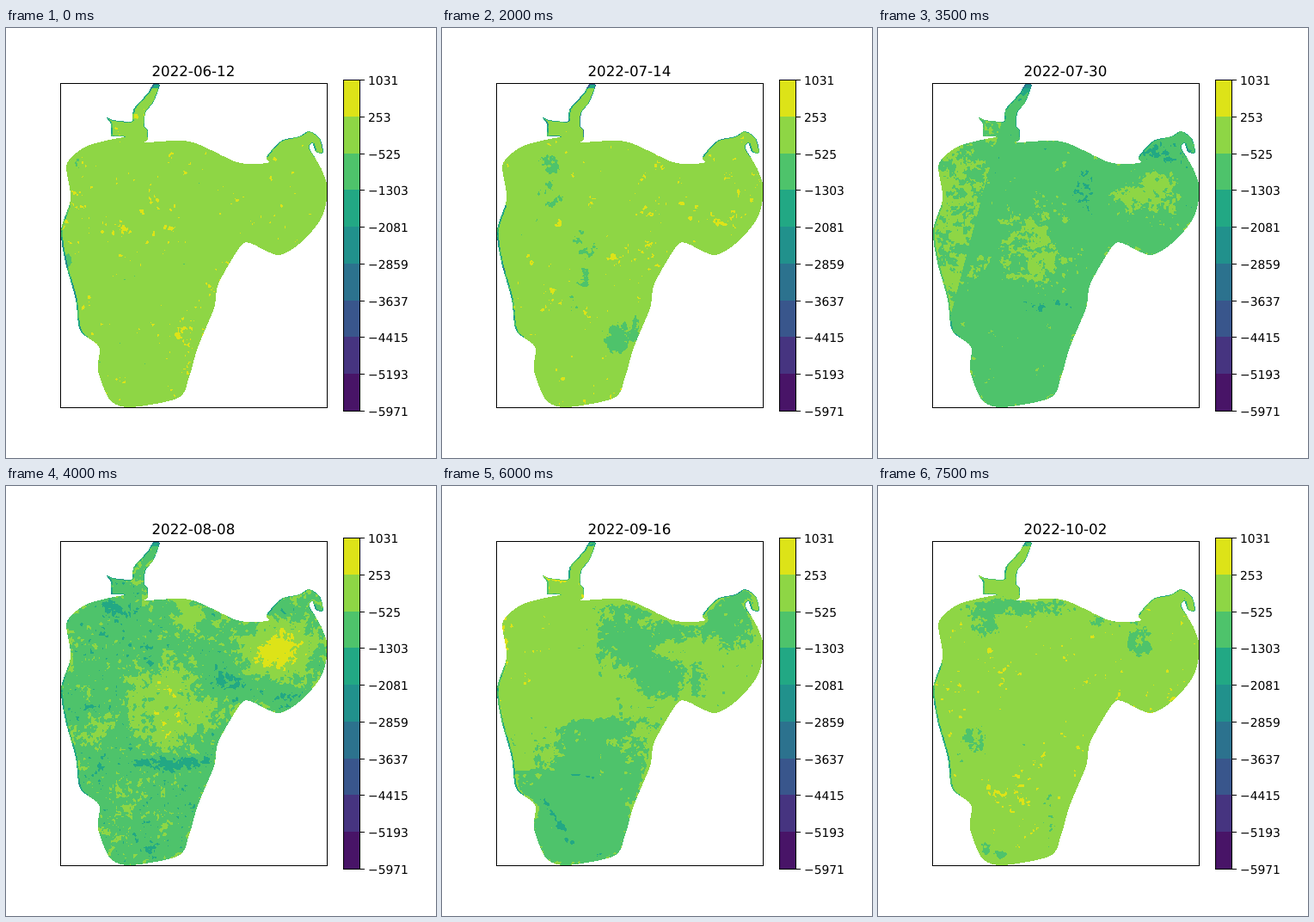
An HTML page with a canvas for the animation above (8000 ms loop, 500 by 500 pixels).

```html
<!DOCTYPE html>
<html lang="en">
<head>
<meta charset="utf-8">
<style>
html, body { margin: 0; width: 100%; height: 100%; overflow: hidden; background: #fff; }
canvas, svg { position: absolute; left: 0; top: 0; width: 500px; height: 500px; }
text { font-family: "DejaVu Sans", sans-serif; font-size: 13.89px; text-rendering: geometricPrecision; }
#date { font-size: 16.67px; text-anchor: middle; }
</style>
</head>
<body>
<canvas id="map" width="500" height="500"></canvas>
<svg id="plot" viewBox="0 0 500 500">
  <text id="date" x="217.9" y="56"></text>
  <rect x="63.5" y="64.5" width="310" height="377" fill="none" stroke="#000"/>
</svg>
<script>
const SIZE = 500, STEP = 500;
const COLORS = ['#dde318', '#8ed645', '#4ec36b', '#22a884', '#21918c', '#2c728e', '#39568c', '#463480', '#481467'];

// Key points of the shoreline and of the inlet above it
const LAKE = '78,148 97,136 138,127 157,133 213,132 265,155 288,158 306,156 303,149 320,131 340,126 352,120 364,128 368,144 360,143 356,133 352,139 366,164 373,188 366,220 343,248 316,263 283,249 271,254 246,297 241,325 222,371 212,405 200,429 145,440 121,432 107,398 108,370 86,351 81,315 69,272 64,235 75,200 73,180 70,160';
const INLET = '171,65 178,66 171,85 161,98 160,114 164,118 164,129 157,133 138,128 136,125 122,125 122,111 117,104 124,107 146,109 148,94 165,75';

const clamp = (v, lo, hi) => Math.max(lo, Math.min(hi, v));

// Closed Catmull-Rom curve; a smaller bend keeps the corners sharper
function curve(text, bend) {
  const pts = text.split(' ').map(p => p.split(',').map(Number));
  const at = i => pts[(i + pts.length) % pts.length];
  const handle = (i, sign) => at(i).map((v, k) => v + sign * bend * (at(i + 1)[k] - at(i - 1)[k]) / 6);
  return new Path2D('M' + at(0) + pts.map((_, i) => `C${handle(i, 1)} ${handle(i + 1, -1)} ${at(i + 1)}`).join('') + 'Z');
}

const canvas = document.getElementById('map');
const ctx = canvas.getContext('2d', { willReadFrequently: true });
ctx.translate(0.5, 0.5);
for (const path of [curve(LAKE, 0.8), curve(INLET, 0.3)]) {
  ctx.fill(path);
  ctx.stroke(path);
}
const alpha = ctx.getImageData(0, 0, SIZE, SIZE).data;
const inside = (x, y) => x > 63 && x < 373 && y > 64 && y < 441 && alpha[(y * SIZE + x) * 4 + 3] > 127;
const cells = [];
for (let y = 65; y < 441; y++) for (let x = 64; x < 373; x++) if (inside(x, y)) cells.push([x, y]);

// City-block distance to the shore
const depth = new Uint16Array(SIZE * SIZE);
const reach = (a, b) => 1 + Math.min(depth[a], depth[b]);
for (const [x, y] of cells) {
  const i = y * SIZE + x;
  depth[i] = reach(i - 1, i - SIZE);
}
for (const [x, y] of [...cells].reverse()) {
  const i = y * SIZE + x;
  depth[i] = Math.min(depth[i], reach(i + 1, i + SIZE));
}

// Wrapping value noise centred on zero
function noise(scales, seed) {
  const tile = new Float32Array(512 * 512);
  const hash = (x, y, s) => {
    let h = Math.imul(x, 374761393) ^ Math.imul(y, 668265263) ^ Math.imul(s + seed, 1274126177);
    h = Math.imul(h ^ h >>> 13, 1103515245);
    return ((h ^ h >>> 16) >>> 0) / 4294967296 - 0.5;
  };
  const ease = t => t * t * (3 - 2 * t);
  for (const scale of scales) {
    const wrap = 512 / scale - 1;
    for (let y = 0, i = 0; y < 512; y++) for (let x = 0; x < 512; x++, i++) {
      const gx = Math.floor(x / scale), gy = Math.floor(y / scale);
      const u = ease(x / scale - gx), v = ease(y / scale - gy);
      const hx = gx + 1 & wrap, hy = gy + 1 & wrap;
      const a = hash(gx, gy, scale), b = hash(hx, gy, scale);
      const c = hash(gx, hy, scale), d = hash(hx, hy, scale);
      tile[i] += (a + (b - a) * u + (c - a) * v + (a - b - c + d) * u * v) / scales.length;
    }
  }
  return (x, y) => clamp(tile[(y & 511) << 9 | (x & 511)] * 1.8, -0.5, 0.5);
}
const speckle = noise([8, 4, 2], 3);
const drift = noise([32, 16, 8, 4], 11);

const ridge = (distance, width) => Math.exp(-((distance / width) ** 4));

// Rivers exposed at the southern end: one arc and two joining branches
function rivers(x, y) {
  const arc = ridge(y - 332 - (x - 110) ** 2 / 620, 2);
  const west = y > 362 && y < 436 ? ridge(x - 118 - 0.68 * (y - 368), 7) : 0;
  const east = y > 403 ? ridge(x - 212 + 1.2 * (y - 403), 5) : 0;
  return 0.8 * Math.max(x < 230 ? arc : 0, west, east);
}

// A level of 1.x is lime, 2.x green and so on. Hills are x, y, radii and height.
const KEYS = [
  { at: 0, base: 1.4, hills: [[83, 158, 4, 8, 0.7], [71, 270, 5, 9, 0.8]] },
  { at: 4, base: 1.4, shore: 1.2, hills: [
    [123, 157, 14, 14, 0.6], [127, 196, 18, 18, 0.5], [104, 225, 9, 12, 0.4], [165, 245, 18, 28, 0.4],
    [163, 290, 13, 12, 0.42], [150, 325, 10, 16, 0.45], [206, 358, 19, 21, 0.85], [225, 352, 6, 20, 0.45]] },
  { at: 6, base: 2.4, shore: 0.3, rim: -0.2, swath: true, hills: [
    [205, 145, 22, 14, 0.7], [235, 185, 17, 36, 0.85], [270, 170, 35, 18, 0.55], [335, 145, 38, 24, 1.2],
    [315, 195, 26, 24, 0.75], [362, 195, 16, 38, 0.8], [222, 245, 20, 19, 0.65], [205, 225, 9, 12, 0.5],
    [160, 95, 22, 36, 0.8], [172, 68, 9, 8, 2]] },
  { at: 8, base: 2.45, grain: 2.2, shore: 0.6, rim: -0.3, hills: [
    [318, 190, 48, 34, -1], [320, 192, 28, 22, -0.7], [190, 262, 52, 52, -0.9], [180, 265, 8, 20, -0.5],
    [105, 285, 28, 22, -0.5], [213, 148, 18, 15, -0.8], [122, 395, 10, 28, -0.3], [85, 262, 22, 16, 0.5],
    [122, 143, 22, 12, 0.5], [190, 322, 42, 9, 0.9], [262, 228, 24, 10, 0.7], [335, 242, 25, 9, 0.7]] },
  { at: 10, base: 2.4, rim: -1, hills: [
    [85, 225, 86, 75, -1], [100, 340, 33, 52, -1], [95, 150, 40, 36, -1], [150, 95, 45, 36, -1],
    [205, 158, 16, 16, -0.45], [320, 138, 18, 7, -0.6], [172, 248, 12, 40, -0.3]] },
  { at: 13, base: 1.4, shore: 0.8, extra: rivers, hills: [
    [140, 400, 140, 120, 1], [185, 280, 35, 12, 0.75], [215, 175, 38, 44, 0.9], [250, 222, 32, 22, 0.9],
    [275, 165, 28, 18, 0.55], [335, 150, 32, 36, 0.9], [298, 225, 13, 22, 0.5], [90, 149, 15, 10, 0.65],
    [135, 358, 40, 16, 0.35]] },
  { at: 15, base: 1.4, shore: 0.8, hills: [
    [155, 142, 70, 12, 0.8], [125, 163, 18, 14, 0.65], [265, 156, 34, 9, 0.5], [303, 180, 18, 19, 0.75],
    [113, 290, 16, 25, 0.45], [198, 385, 8, 32, 0.47], [123, 421, 7, 11, 0.65], [145, 427, 11, 6, 0.6]] }
];

// Wet strip on west-facing banks, around the inlet and along the eastern hook
function wetBank(x, y, grain) {
  const inlet = y < 127 && x < 190, hook = y < 150 && x > 300;
  const facing = !inside(x - 2, y) || (inlet || hook) && depth[y * SIZE + x] < 2;
  const tip = inlet && y < 70 ? 2 : 0;
  return tip + (facing && (inlet || hook || x < 95 && y > 205) ? 1.8 + 3 * grain : 0);
}

function levels({ at, base, hills, grain = 1.3, shore = 1, rim = 0, swath, extra }) {
  return Float32Array.from(cells, ([x, y]) => {
    if (swath && x < 143 - 0.264 * (y - 110)) return 1.5;
    const n = (drift(x + at * 37, y) + speckle(x, y + at * 23)) / 2;
    let level = base + grain * n + rim * ridge(depth[y * SIZE + x], 4.5) + shore * wetBank(x, y, n);
    for (const [cx, cy, rx, ry, height] of hills) {
      const r2 = ((x - cx) / rx) ** 2 + ((y - cy) / ry) ** 2;
      if (r2 < 3) level += height * Math.exp(-r2 * r2);
    }
    return extra ? level + extra(x, y) : level;
  });
}

const rgb = COLORS.map(c => [1, 3, 5].map(i => parseInt(c.slice(i, i + 2), 16)));
const fields = KEYS.map(levels);

// Passes between two keys blend their levels
function paint(_, index) {
  const next = KEYS.findIndex(key => key.at >= index), prev = Math.max(0, next - 1);
  const span = KEYS[next].at - KEYS[prev].at;
  const t = span ? (index - KEYS[prev].at) / span : 0;
  const image = ctx.createImageData(SIZE, SIZE);
  cells.forEach(([x, y], i) => {
    const level = fields[prev][i] * (1 - t) + fields[next][i] * t;
    const [r, g, b] = rgb[clamp(Math.floor(level), 0, 8)];
    const p = (y * SIZE + x) * 4;
    image.data[p] = r;
    image.data[p + 1] = g;
    image.data[p + 2] = b;
    image.data[p + 3] = 255;
  });
  return image;
}

// Days since the first pass: every eighth day, plus a few from the neighbouring track
const DAYS = [0, 8, 16, 24, 32, 40, 41, 48, 57, 72, 80, 88, 96, 104, 105, 112];
const images = DAYS.map(paint);
const dateOf = day => new Date(Date.UTC(2022, 5, 12 + day)).toISOString().slice(0, 10);

const plot = document.getElementById('plot');
function add(tag, attrs, text = '') {
  const node = document.createElementNS('http://www.w3.org/2000/svg', tag);
  for (const key in attrs) node.setAttribute(key, attrs[key]);
  node.textContent = text;
  plot.append(node);
}
const levelY = i => Math.round(60 + i * 42.78);
COLORS.forEach((fill, i) => add('rect', { x: 392, y: levelY(i), width: 20, height: levelY(i + 1) - levelY(i), fill }));
add('rect', { x: 392.5, y: 60.5, width: 19, height: 385, fill: 'none', stroke: '#000' });
for (let i = 0; i < 10; i++) {
  add('path', { d: `M412 ${levelY(i) + 0.5}h5`, stroke: '#000' });
  add('text', { x: 421, y: levelY(i) + 6 }, String(1031 - 778 * i).replace('-', '\u2212'));
}

const date = document.getElementById('date');
const start = performance.now();
let shown = -1;
function draw() {
  const index = Math.floor((performance.now() - start) / STEP) % DAYS.length;
  if (index !== shown) {
    shown = index;
    ctx.putImageData(images[index], 0, 0);
    date.textContent = dateOf(DAYS[index]);
  }
  requestAnimationFrame(draw);
}
draw();
</script>
</body>
</html>
```
